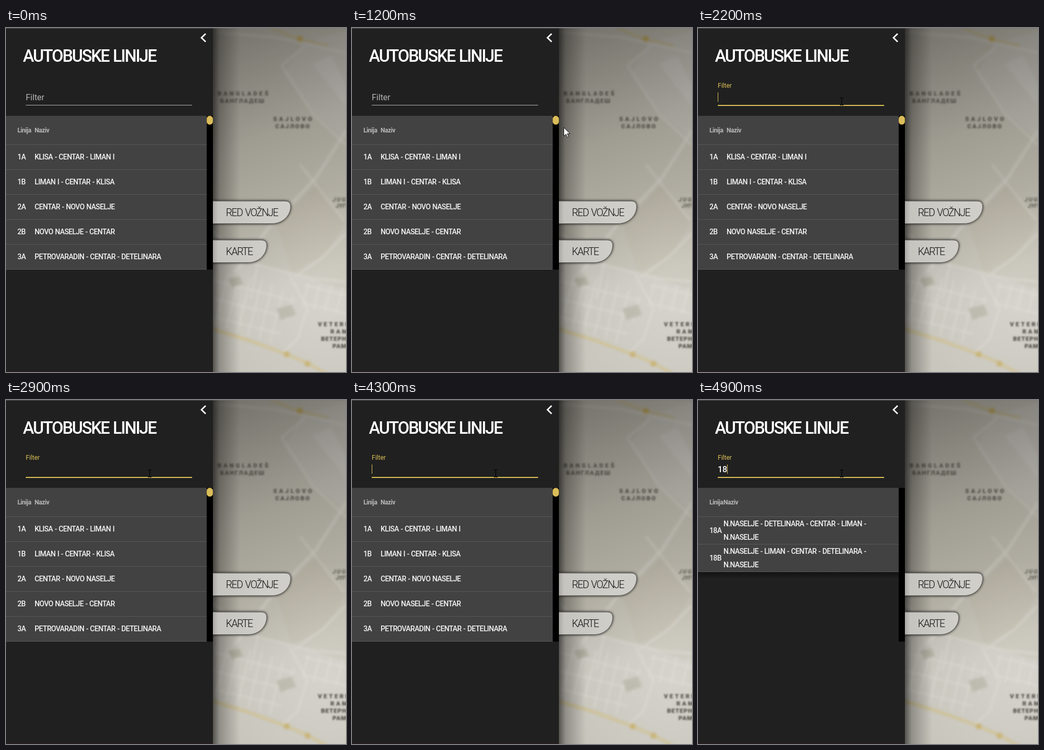
Recreate the animation shown at these times as an HTML page. Size 654 px wide and 662 px high, loop 5 s.

```html
<!DOCTYPE html>
<html lang="sr">
<head>
<meta charset="utf-8">
<title>Autobuske linije</title>
<style>
  html, body { margin: 0; width: 100%; height: 100%; overflow: hidden; background: #202020; }
  svg { display: block; width: 654px; height: 662px; }
  text { font-family: Roboto, "Open Sans", sans-serif; }
  .title { font-size: 32.5px; font-weight: 500; letter-spacing: -2.1px; word-spacing: 1.5px; fill: #fff; }
  .row { font-size: 14px; font-weight: 500; letter-spacing: -.62px; word-spacing: .8px; fill: #f4f4f4; }
  .head { font-size: 12px; font-weight: 600; letter-spacing: -.45px; fill: #b8b8b8; }
  .tab { font-size: 19.5px; font-weight: 300; letter-spacing: -1.55px; word-spacing: 2px; fill: #111; }
  .place { font-size: 11.5px; font-weight: 900; fill: #4b4942; }
</style>
</head>
<body>
<svg viewBox="0 0 654 662">
  <defs>
    <filter id="blur" x="-10%" y="-10%" width="120%" height="120%"><feGaussianBlur stdDeviation="2.4"/></filter>
    <filter id="soft" x="-10%" y="-60%" width="120%" height="220%"><feGaussianBlur stdDeviation="1.8"/></filter>
    <filter id="drop" x="-20%" y="-40%" width="140%" height="180%">
      <feDropShadow dx="0" dy="0" stdDeviation="2.8" flood-opacity=".9"/>
    </filter>
    <linearGradient id="dusk" gradientUnits="userSpaceOnUse" x1="400" y1="0" x2="580" y2="480">
      <stop stop-color="#000" stop-opacity=".41"/>
      <stop offset=".45" stop-color="#000" stop-opacity=".18"/>
      <stop offset="1" stop-color="#000" stop-opacity="0"/>
    </linearGradient>
    <radialGradient id="glow" gradientUnits="userSpaceOnUse" cx="620" cy="530" r="220">
      <stop stop-color="#fff" stop-opacity=".25"/><stop offset="1" stop-color="#fff" stop-opacity="0"/>
    </radialGradient>
    <linearGradient id="edge">
      <stop stop-color="#000" stop-opacity=".58"/>
      <stop offset=".25" stop-color="#000" stop-opacity=".27"/>
      <stop offset="1" stop-color="#000" stop-opacity="0"/>
    </linearGradient>
    <linearGradient id="tabFill" gradientUnits="userSpaceOnUse" x1="398" y1="0" x2="500" y2="0">
      <stop stop-color="#a9a8a4"/><stop offset=".1" stop-color="#c5c4bf"/><stop offset="1" stop-color="#d0cec9"/>
    </linearGradient>
    <linearGradient id="under" x2="0" y2="1">
      <stop stop-opacity=".4"/><stop offset="1" stop-opacity="0"/>
    </linearGradient>
    <pattern id="streets" width="22" height="34" patternUnits="userSpaceOnUse" patternTransform="rotate(14)">
      <path d="M0 0H22M0 0V34" stroke="#dedbd3" stroke-opacity=".7" stroke-width="4" fill="none"/>
    </pattern>
    <clipPath id="mapClip"><path d="M398 0H654V662H398Z"/></clipPath>
  </defs>

  <g clip-path="url(#mapClip)">
    <path d="M380 0H654V662H380Z" fill="#c2beb2"/>
    <g filter="url(#blur)">
      <path d="M570 30L670 0V230L590 160L535 90Z" fill="#c6c3ba"/>
      <path d="M590 70L625 52L654 110V150Z" fill="#cdcac3"/>
      <path d="M390 400L480 455L580 480L670 510V670H390Z" fill="#c8c5bc"/>
      <path d="M390 470L500 485L560 520L520 610L390 570ZM575 490L670 500V555L570 540Z" fill="url(#streets)"/>
      <path d="M520 375L600 300L654 372L612 440L550 470Z" fill="#bfbaab"/>
      <path d="M428 482L450 478L456 493L434 499ZM520 540L550 532L558 552L528 562Z" fill="#b2afa1"/>
      <g fill="none" stroke="#d9d6cd" stroke-opacity=".6" stroke-width="6">
        <path d="M398 8L520 18L654 48M530 72L575 35M530 72L590 165L654 225" stroke-width="4"/>
        <path d="M654 198L595 290L505 385L440 470"/>
        <path d="M565 262L650 370M654 395L610 440L555 480M390 385L470 452L590 482L654 488" stroke-width="4"/>
        <path d="M485 452L470 520M545 475L580 540L560 600L530 626" stroke-width="4"/>
      </g>
      <path d="M510 0L565 22L620 34" fill="none" stroke="#c6b98c" stroke-width="4"/>
      <path d="M390 577L470 602L540 628L580 645L625 670" fill="none" stroke="#c5b683" stroke-width="6"/>
      <path d="M390 577L470 602L540 628L580 645L625 670" fill="none" stroke="#d3c99f" stroke-width="2"/>
      <g fill="#c2ac62"><circle cx="565" cy="21" r="6"/><circle cx="540" cy="628" r="6"/><circle cx="580" cy="646" r="6"/></g>
    </g>
    <path d="M398 0H654V662H398Z" fill="url(#dusk)"/>
    <path d="M398 0H654V662H398Z" fill="url(#glow)"/>
    <g filter="url(#soft)" class="place">
      <text x="407" y="130" letter-spacing="3.9">BANGLADEŠ</text>
      <text x="412" y="144" letter-spacing="1.7">БАНГЛАДЕШ</text>
      <text x="514" y="179" letter-spacing="4">SAJLOVO</text>
      <text x="518" y="193" letter-spacing="2.1">САЈЛОВО</text>
      <g font-style="italic" opacity=".75"><text x="628" y="334" letter-spacing="2">JUGO</text><text x="634" y="346">ЈУГО</text></g>
      <text x="600" y="574" letter-spacing="3.5">VETERNIK</text>
      <text x="624" y="588" letter-spacing="3.5">RAMPA</text>
      <text x="606" y="602" letter-spacing="1">ВЕТЕРНИК</text>
      <text x="628" y="616" letter-spacing="1">РАМПА</text>
    </g>
    <path d="M398 0H450V662H398Z" fill="url(#edge)"/>
    <g filter="url(#drop)" fill="url(#tabFill)" stroke="#55534f">
      <path d="M390 333H537Q547.5 333 547.5 343C547.5 362 531 376.5 512 376.5H390Z"/>
      <path d="M390 408H491Q501.5 408 501.5 418C501.5 437 485 451.5 466 451.5H390Z"/>
    </g>
    <text class="tab" x="423" y="362">RED VOŽNJE</text>
    <text class="tab" x="423" y="437">KARTE</text>
  </g>

  <path d="M0 0H398V662H0Z" fill="#202020"/>
  <path d="M0 .5H654" stroke="#777" stroke-opacity=".6"/>
  <path d="M0 661.5H398" stroke="#35191f"/>
  <path d="M384 11L376 18.8L384 26.6" fill="none" stroke="#fff" stroke-width="2.8"/>
  <text class="title" x="32.5" y="65">AUTOBUSKE LINIJE</text>

  <text id="label" x="0" y="0" font-size="16">Filter</text>
  <path d="M38 148.5H358" stroke="#b5b5b5"/>
  <path id="focusLine" d="M-160 0H160" stroke="#dfc257" stroke-width="2"/>
  <text id="typed" x="38" y="139" font-size="16" font-weight="500" fill="#fff"></text>
  <path id="caret" d="M.5 124V142" stroke="#dfc257"/>

  <g id="table"></g>
  <path d="M386 169H398V465H386Z" fill="#000"/>
  <rect id="thumb" x="386.5" y="169.5" width="11" rx="5" fill="#dabd5b" stroke="#c9aa45"/>

  <path id="arrow" d="M0 0V16.5L4 12.8L6.7 18.8L9.2 17.7L6.6 12H11.8Z" fill="#fff" stroke="#111"/>
  <path id="beam" d="M-3 -6.5H-1L.5 -5.5L2 -6.5H4M.5 -5.5V6M-3 7.5H-1L.5 6.5L2 7.5H4" fill="none" stroke="#000" stroke-width="1.2"/>
</svg>

<script>
const LOOP = 5000, FOCUS = 1900, CARET_START = 2000, VIEW_BOTTOM = 465;
const el = id => document.getElementById(id);
const clamp = x => Math.max(0, Math.min(1, x));
const show = (id, on) => el(id).setAttribute('display', on ? 'inline' : 'none');
const move = (id, x, y, rest = '') => el(id).setAttribute('transform', `translate(${x} ${y}) ${rest}`);

const lists = {
  all: { thumb: 17, nameX: 55, rowHeight: 48, rows: [
    ['1A', 'KLISA - CENTAR - LIMAN I'],
    ['1B', 'LIMAN I - CENTAR - KLISA'],
    ['2A', 'CENTAR - NOVO NASELJE'],
    ['2B', 'NOVO NASELJE - CENTAR'],
    ['3A', 'PETROVARADIN - CENTAR - DETELINARA']] },
  one: { thumb: 49, nameX: 55, rowHeight: 48, rows: [
    ['1A', 'KLISA - CENTAR - LIMAN I'],
    ['1B', 'LIMAN I - CENTAR - KLISA'],
    ['10A', 'CENTAR - INDUST.ZONA JUG'],
    ['10B', 'INDUST.ZONA JUG - CENTAR'],
    ['11A', 'Z.STANICA - BOLNICA - LIMAN - Z.STANICA']] },
  eighteen: { thumb: 0, nameX: 49, rowHeight: 53, rows: [
    ['18A', 'N.NASELJE - DETELINARA - CENTAR - LIMAN -', 'N.NASELJE'],
    ['18B', 'N.NASELJE - LIMAN - CENTAR - DETELINARA -', 'N.NASELJE']] }
};

const text = (style, x, y, s) => `<text class="${style}" x="${x}" y="${y}">${s}</text>`;

function tableMarkup({ nameX, rowHeight, rows }) {
  const bottom = 225 + rows.length * rowHeight;
  const shadow = bottom < VIEW_BOTTOM ? `<rect y="${bottom}" width="386" height="14" fill="url(#under)"/>` : '';
  let out = `${shadow}
    <rect y="169" width="386" height="${bottom - 169}" fill="#424242"/>
    <path d="M0 224.5H386" stroke="#585858"/>`;
  out += text('head', 22, 201, 'Linija') + text('head', nameX, 201, 'Naziv');
  rows.forEach(([line, ...names], i) => {
    const top = 225 + i * rowHeight, middle = top + Math.floor(rowHeight / 2) + 4;
    out += text('row', 22, middle + (names.length < 2 ? 0 : 1), line);
    names.forEach((name, k) => {
      out += text('row', nameX, names.length < 2 ? middle : top + 18 + k * 26, name);
    });
    out += `<path d="M0 ${top + rowHeight - .5}H386" stroke="#585858"/>`;
  });
  return out;
}

let shownList;
function setList(name) {
  if (name === shownList) return;
  shownList = name;
  const list = lists[name];
  el('table').innerHTML = tableMarkup(list);
  show('thumb', list.thumb > 0);
  el('thumb').setAttribute('height', Math.max(0, list.thumb - 1));
}

function drawPointer(t) {
  const p = Math.min(1, (t - 1200) / 600);
  const x = Math.round(407 - 131 * p), y = Math.round(191 - 50 * p);
  const overField = x < 358 && y < 152;
  show('arrow', t >= 1000 && !overField);
  show('beam', overField);
  move('arrow', x + .5, y + .5);
  move('beam', x, y);
}

function drawField(t) {
  const focus = 1 - (1 - clamp((t - FOCUS) / 300)) ** 3;
  const value = t < 4400 ? '' : t < 4700 ? '1' : '18';
  move('label', 38, 139 - 24 * focus, `scale(${1 - .25 * focus})`);
  el('label').setAttribute('fill', t < FOCUS ? '#b5b5b5' : '#dfc257');
  show('focusLine', focus > 0);
  move('focusLine', 198, 149, `scale(${focus} 1)`);
  el('typed').textContent = value;
  const width = value ? el('typed').getComputedTextLength() : 0;
  move('caret', 38 + Math.round(width), 0);
  show('caret', t >= CARET_START && (value || (t - CARET_START) % 1000 < 500));
}

function frame(now) {
  const t = now % LOOP;
  drawPointer(t);
  drawField(t);
  setList(t < 4600 ? 'all' : t < 4900 ? 'one' : 'eighteen');
  requestAnimationFrame(frame);
}
frame(0);
</script>
</body>
</html>
```
